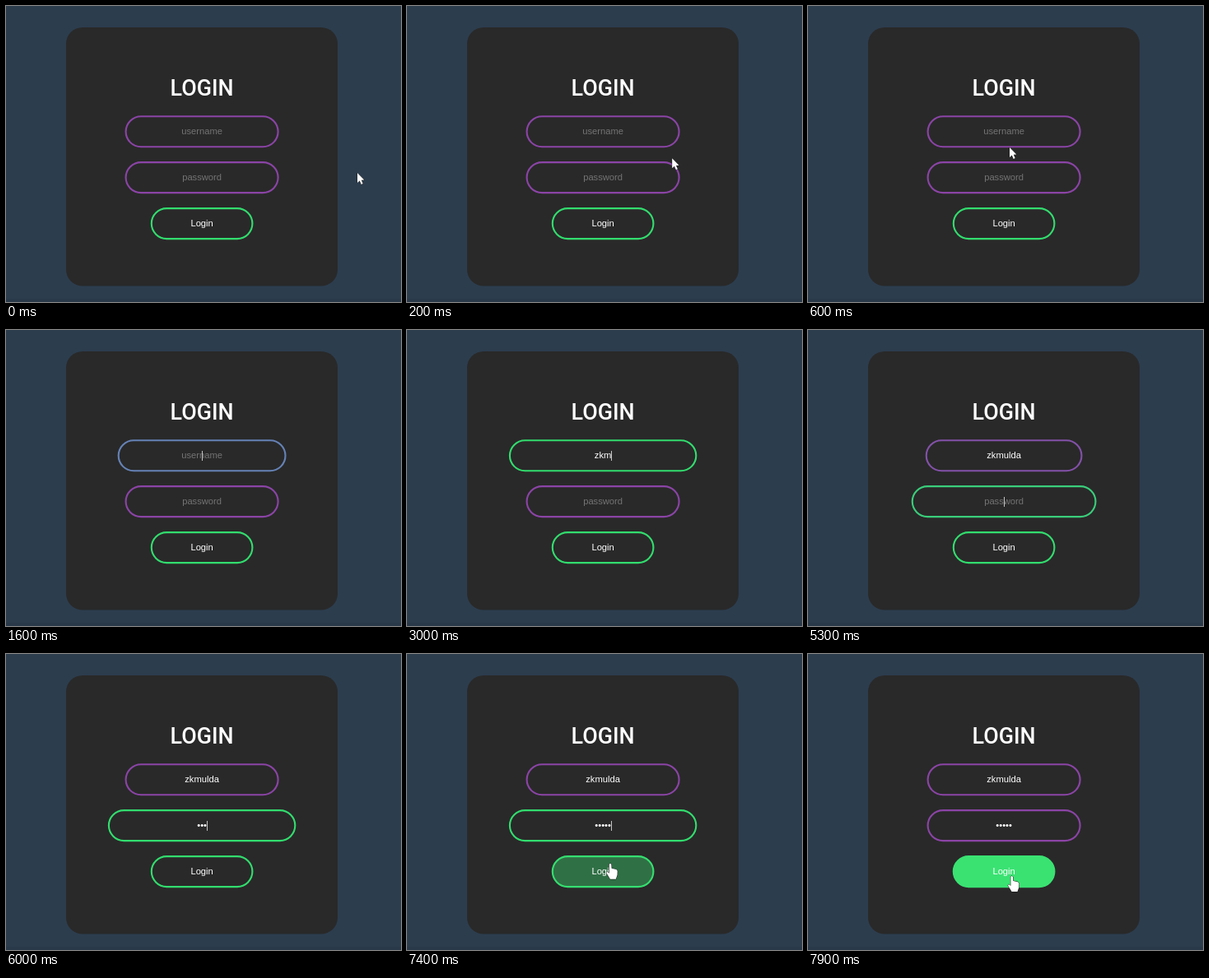
Animation of 480x360 px, one loop 8000 ms. Source, as an HTML page with a canvas:

```html
<!DOCTYPE html>
<html lang="en">
<head>
<meta charset="utf-8">
<title>Login form</title>
<style>
  html, body { margin: 0; width: 100%; height: 100%; overflow: hidden; background: #2c3d4e; }
  canvas { display: block; width: 480px; height: 360px; }
</style>
</head>
<body>
<canvas id="stage" width="480" height="360"></canvas>
<script>
const ctx = document.getElementById('stage').getContext('2d');
const LOOP = 8000, STEP = 100, FADE = 250, BLINK = 500, MID = 238.1;
const PURPLE = [139, 68, 166], BLUE = [95, 140, 185], GREEN = [50, 221, 110];
const PANEL = [41, 41, 41], FILL = [58, 226, 114];
const SANS = '11.2px "Liberation Sans", Arial, sans-serif';

// focus, blur and key presses of each field, in ms
const user = { top: 134.3, hint: 'username', focus: 1535, blur: 5140,
               keys: [2700, 2900, 3000, 3600, 3700, 3900, 4100], show: n => 'zkmulda'.slice(0, n) };
const pass = { top: 190.1, hint: 'password', focus: 5140, blur: 7440,
               keys: [5800, 5900, 6000, 6200, 6300], show: n => '•'.repeat(n) };
const HOVER = 7340;

// [time, x, y] of the pointer tip
const path = [[0, 427, 203], [600, 245, 172], [900, 242, 158], [7000, 242, 158], [7700, 247, 270]];

const lerp = (a, b, p) => a + (b - a) * p;
const clamp = v => Math.min(1, Math.max(0, v));
const mix = (a, b, p) => a.map((v, i) => lerp(v, b[i], p));
const rgb = c => `rgb(${c.map(Math.round)})`;

// cubic-bezier(.25, .1, .25, 1)
function ease(x) {
  if (x <= 0 || x >= 1) return clamp(x);
  const bez = (a, b, s) => 3 * a * s * (1 - s) ** 2 + 3 * b * s * s * (1 - s) + s ** 3;
  let lo = 0, hi = 1;
  for (let i = 0; i < 20; i++) {
    const s = (lo + hi) / 2;
    if (bez(.25, .25, s) < x) lo = s; else hi = s;
  }
  return bez(.1, 1, lo);
}

const fade = (t, start) => ease((t - start) / FADE);

function pill(half, top, stroke, fill) {
  const height = 37;
  ctx.beginPath();
  ctx.roundRect(MID - half, top, half * 2, height, height / 2);
  if (fill) { ctx.fillStyle = rgb(fill); ctx.fill(); }
  ctx.strokeStyle = rgb(stroke);
  ctx.lineWidth = 2.1;
  ctx.stroke();
}

function label(text, y, color, font = SANS) {
  ctx.font = font;
  ctx.fillStyle = color;
  ctx.textAlign = 'center';
  ctx.fillText(text, MID, y);
  return ctx.measureText(text).width;
}

function field({ top, hint, focus, blur, keys, show }, t) {
  const p = fade(t, focus) - fade(t, blur);
  pill(lerp(92.5, 113.2, p), top, p < .5 ? mix(PURPLE, BLUE, p * 2) : mix(BLUE, GREEN, p * 2 - 1));

  const pressed = keys.filter(k => k <= t);
  const value = show(pressed.length);
  const width = label(value || hint, top + 21.8, value ? '#fff' : '#747474');

  // the caret restarts its blink at focus and at every key
  const since = t - (pressed.at(-1) ?? Math.ceil(focus / STEP) * STEP);
  if (t >= focus && t < blur && Math.floor(since / BLINK) % 2 === 0) {
    ctx.fillStyle = '#c4c4c4';
    ctx.fillRect(Math.round(MID + (value ? width / 2 : 0)), Math.round(top) + 13, 1, 12);
  }
}

function shape(points, x, y) {
  ctx.beginPath();
  for (const [px, py] of points) ctx.lineTo(x + px, y + py);
  ctx.closePath();
  ctx.fillStyle = '#fff';
  ctx.strokeStyle = '#1b1b1b';
  ctx.lineWidth = 1;
  ctx.stroke();
  ctx.fill();
}

const ARROW = [[0, 0], [0, 12], [2.8, 9.6], [4.7, 14], [6.7, 13.1], [4.8, 8.8], [8.3, 8.5]];
const HAND = [[-.6, .8], [.6, 0], [2, .8], [2.3, 6], [8, 7.2], [9.4, 9], [9.2, 14],
              [7.5, 19], [.6, 19], [-4, 11.5], [-3.2, 10], [-.6, 12]];

function pointer(t) {
  const i = Math.max(1, path.findIndex(([at]) => at > t));
  const [from, to] = t < path.at(-1)[0] ? [path[i - 1], path[i]] : path.slice(-2);
  const [, x, y] = mix(from, to, ease((t - from[0]) / (to[0] - from[0])));
  const inField = x < 332 && [user, pass].some(f => y >= f.top && y < f.top + 37);
  if (!inField) shape(y >= 245 ? HAND : ARROW, x, y);
}

function draw(t) {
  ctx.fillStyle = '#2c3d4e';
  ctx.fillRect(0, 0, 480, 360);
  ctx.fillStyle = '#2a394a';
  ctx.fillRect(0, 356, 480, 4);

  ctx.fillStyle = rgb(PANEL);
  ctx.beginPath();
  ctx.roundRect(73, 26, 330, 314.5, 20);
  ctx.fill();

  label('LOGIN', 109, '#fff', '500 26.8px Roboto, sans-serif');
  field(user, t);
  field(pass, t);

  const hover = fade(t, HOVER);
  pill(61.3, 246.1, mix(GREEN, FILL, hover), mix(PANEL, FILL, hover));
  label('Login', 267.8, '#fff');
  pointer(t);
}

const begin = performance.now();
function tick() {
  const t = (performance.now() - begin) % LOOP;
  draw(Math.floor(t / STEP) * STEP);
  requestAnimationFrame(tick);
}
tick();
</script>
</body>
</html>
```
